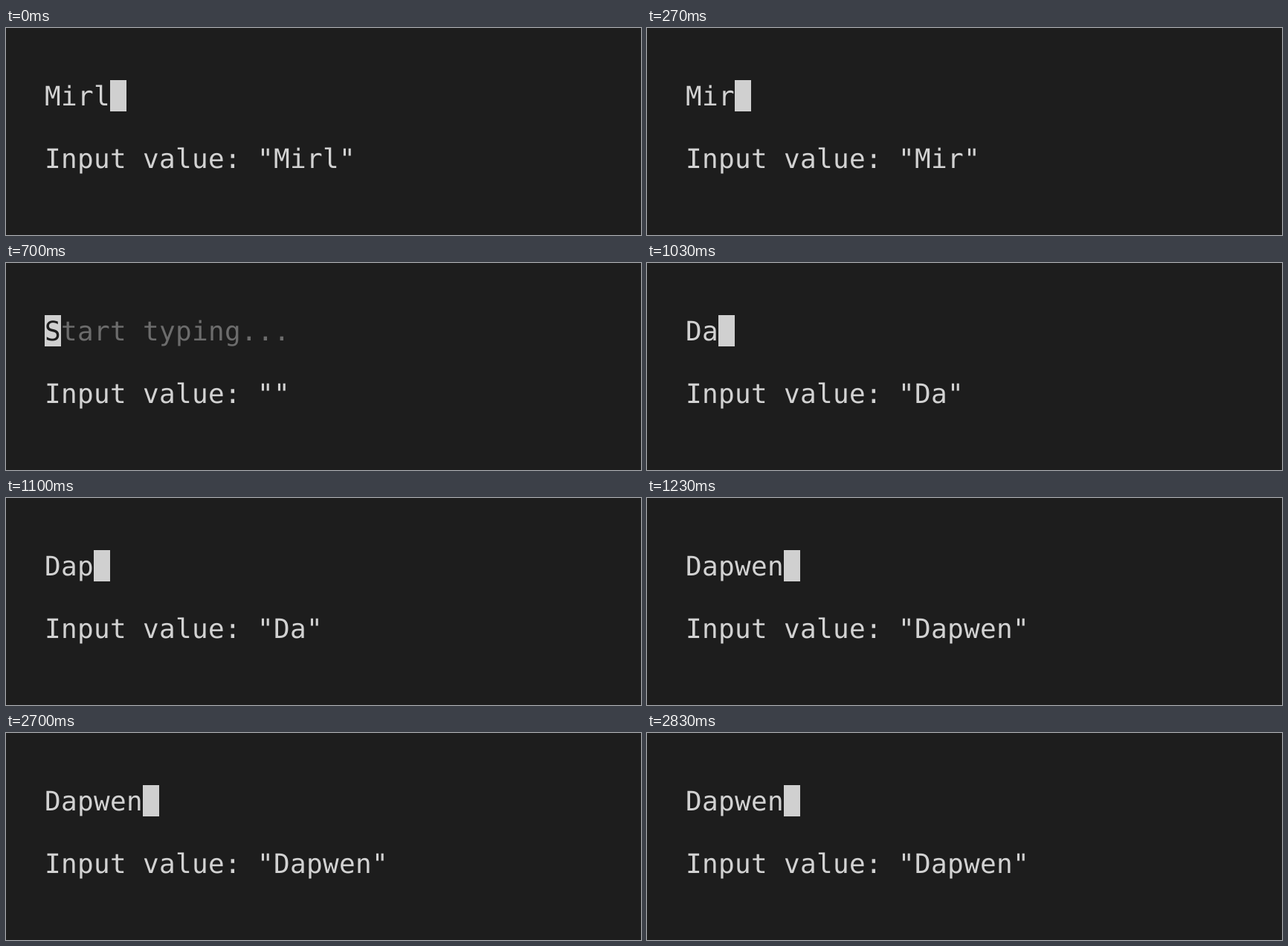
Animation, 854 px wide and 278 px high, one loop 3350 ms. Source, as an HTML page:

```html
<!DOCTYPE html>
<html lang="en">
<head>
<meta charset="utf-8">
<title>Text input</title>
<style>
  html, body { margin: 0; width: 100%; height: 100%; overflow: hidden; background: #1d1d1d; }
  svg { display: block; width: 854px; height: 278px; }
  text {
    font: 36px "DejaVu Sans Mono", monospace;
    letter-spacing: 0.326px;
    text-rendering: geometricPrecision;
    fill: #d2d2d2;
    white-space: pre;
  }
  #cursor { fill: #d0d0d0; }
  #hint { fill: #6c6c6c; }
  #under { fill: #1d1d1d; }
</style>
</head>
<body>
<svg viewBox="0 0 854 278">
  <rect width="854" height="278" fill="#1d1d1d"/>
  <rect id="cursor" y="70" width="22" height="42"/>
  <text id="field" x="52" y="104"></text>
  <text id="under" x="52" y="104">S</text>
  <text id="hint" x="74" y="104">tart typing...</text>
  <text id="value" x="52" y="188"></text>
</svg>
<script>
const LOOP = 3350, LEFT = 52, CELL = 22;
const FIRST = "Mirl", SECOND = "Dapwen";

// [start ms, word, letters in the field, letters in the echoed value]
const STEPS = [
  [0, FIRST, 4, 4],
  [270, FIRST, 3, 3],
  [300, FIRST, 2, 3],
  [330, FIRST, 2, 2],
  [470, FIRST, 1, 2],
  [500, FIRST, 1, 1],
  [670, FIRST, 0, 1],
  [700, FIRST, 0, 0],
  [1030, SECOND, 2, 2],
  [1100, SECOND, 3, 2],
  [1130, SECOND, 4, 4],
  [1200, SECOND, 6, 5],
  [1230, SECOND, 6, 6]
];

const get = id => document.getElementById(id);
const [cursor, field, under, hint, value] =
  ["cursor", "field", "under", "hint", "value"].map(get);
let shown = null;

function draw(ms) {
  const step = STEPS.findLast(s => s[0] <= ms);
  if (step === shown) return;
  shown = step;
  const [, word, typed, echoed] = step;
  field.textContent = word.slice(0, typed);
  value.textContent = `Input value: "${word.slice(0, echoed)}"`;
  cursor.setAttribute("x", LEFT + typed * CELL);
  const display = typed ? "none" : "inline";
  under.setAttribute("display", display);
  hint.setAttribute("display", display);
}

const start = performance.now();
function tick(now) {
  draw(Math.max(0, now - start) % LOOP);
  requestAnimationFrame(tick);
}
draw(0);
requestAnimationFrame(tick);
</script>
</body>
</html>
```
